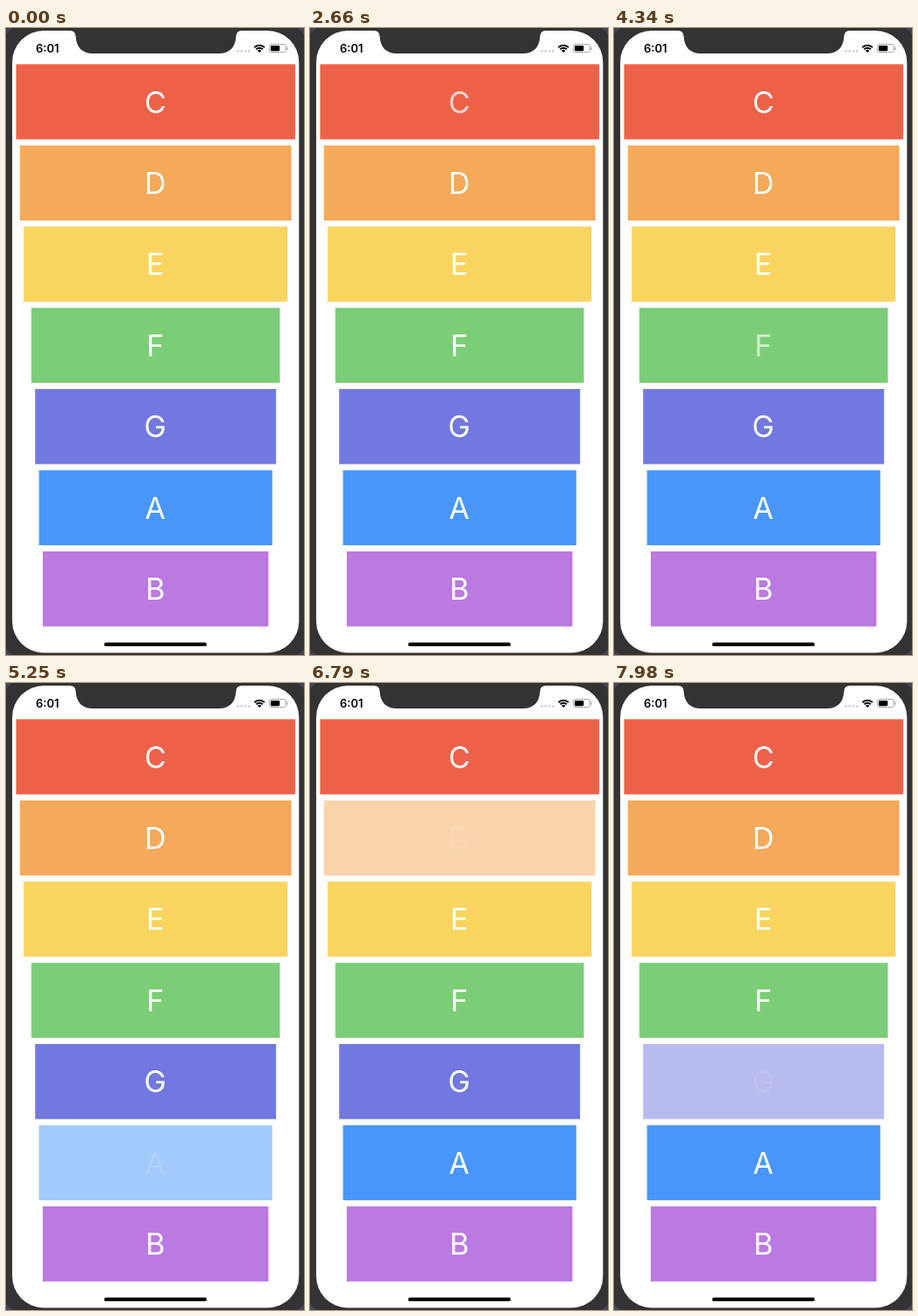
Recreate the animation shown at these times as an HTML page with a canvas. Size 340 by 714 pixels, loop 8 s.

```html
<!DOCTYPE html>
<html lang="en">
<head>
<meta charset="utf-8">
<title>Xylophone</title>
<style>
  html, body { margin: 0; width: 100%; height: 100%; overflow: hidden; background: #333335; }
  canvas { display: block; width: 340px; height: 714px; }
</style>
</head>
<body>
<canvas id="stage"></canvas>
<script>
const W = 340, H = 714, LOOP = 8000, STEP = 70;
const PT = 0.872; // pixels per point on the phone screen
const SCREEN = { x: 7.1, y: 3, w: 327.2, h: 708.5 };
const BEZEL = '#333335';

const keys = [
  { note: 'C', color: '#ed6149', inset: 5, taps: [2370] },
  { note: 'D', color: '#f4a95b', inset: 10, taps: [2930, 6760] },
  { note: 'E', color: '#f9d560', inset: 15, taps: [3490] },
  { note: 'F', color: '#7ccd77', inset: 25, taps: [4080] },
  { note: 'G', color: '#7278dd', inset: 30, taps: [4640, 7950] },
  { note: 'A', color: '#4896f9', inset: 35, taps: [5120] },
  { note: 'B', color: '#bb79e2', inset: 40, taps: [5610] }
];

const HOLD = 80;    // finger down before release
const DIM = 200;    // key stays at half opacity
const FADE = 470;   // title returns to full opacity

const canvas = document.getElementById('stage');
const ctx = canvas.getContext('2d');
const ratio = window.devicePixelRatio || 1;
canvas.width = W * ratio;
canvas.height = H * ratio;
ctx.scale(ratio, ratio);

const ease = p => p * p * (3 - 2 * p);

function roundRect(x, y, w, h, r, color) {
  ctx.beginPath();
  ctx.roundRect(x, y, w, h, r);
  ctx.fillStyle = color;
  ctx.fill();
}

function circle(x, y, r, color) {
  ctx.beginPath();
  ctx.arc(x, y, r, 0, Math.PI * 2);
  ctx.fillStyle = color;
  ctx.fill();
}

function drawPhone() {
  ctx.fillStyle = '#44435a';
  ctx.fillRect(0, 0, W, H);
  roundRect(-9, -8, 358, 730, 41, BEZEL);
  roundRect(SCREEN.x, SCREEN.y, SCREEN.w, SCREEN.h, 36, '#fff');

  ctx.beginPath();
  ctx.moveTo(73, 2);
  ctx.lineTo(73, 3);
  ctx.quadraticCurveTo(79, 3, 79.5, 9);
  ctx.bezierCurveTo(80, 22, 87, 29, 99, 29);
  ctx.lineTo(243, 29);
  ctx.bezierCurveTo(255, 29, 262, 22, 262.5, 9);
  ctx.quadraticCurveTo(263, 3, 269, 3);
  ctx.lineTo(269, 2);
  ctx.closePath();
  ctx.fillStyle = BEZEL;
  ctx.fill();

  roundRect(112, 699.7, 117, 4.4, 2.2, '#000');
}

function drawWifi(x, y) {
  const from = -Math.PI * 0.75, to = -Math.PI * 0.25;
  ctx.strokeStyle = '#000';
  ctx.lineWidth = 1.9;
  for (const r of [8.3, 5.3]) {
    ctx.beginPath();
    ctx.arc(x, y, r, from, to);
    ctx.stroke();
  }
  ctx.beginPath();
  ctx.moveTo(x, y);
  ctx.arc(x, y, 3.1, from, to);
  ctx.closePath();
  ctx.fillStyle = '#000';
  ctx.fill();
}

function drawStatus() {
  ctx.font = '600 13px Inter, sans-serif';
  ctx.textAlign = 'left';
  ctx.fillStyle = '#000';
  ctx.fillText('6:01', 34, 27.8);

  for (let i = 0; i < 4; i++) circle(264.6 + i * 4.2, 26.4, 1.3, '#cfcfcf');
  drawWifi(289.2, 28);

  ctx.beginPath();
  ctx.roundRect(300.5, 18.5, 18.8, 9.2, 2.6);
  ctx.strokeStyle = '#a3a3a3';
  ctx.lineWidth = 1;
  ctx.stroke();
  roundRect(302, 20, 10.3, 6.2, 1.3, '#000');
  roundRect(320.2, 21.5, 1.3, 3.4, [0, 1, 1, 0], '#a3a3a3');
}

function keyState(key, t) {
  let body = 1, title = 1;
  for (const tap of key.taps) {
    const since = t - tap;
    if (since < -HOLD || since >= FADE) continue;
    title = 0.2 + 0.8 * ease(Math.max(0, since) / FADE);
    if (since >= 0 && since < DIM) body = 0.5;
  }
  return { body, title };
}

function drawKey(key, i, t) {
  const { body, title } = keyState(key, t);
  const inset = key.inset * PT;
  const y = 41.3 + i * 92.45;
  ctx.globalAlpha = body;
  ctx.fillStyle = key.color;
  ctx.fillRect(SCREEN.x + inset, y, SCREEN.w - inset * 2, 85.5);
  ctx.globalAlpha = body * title;
  ctx.fillStyle = '#fff';
  ctx.font = '400 34px Inter, sans-serif';
  ctx.textAlign = 'center';
  ctx.fillText(key.note, SCREEN.x + SCREEN.w / 2 - 0.4, y + 55.2);
  ctx.globalAlpha = 1;
}

function render(now) {
  const t = Math.floor((now % LOOP) / STEP) * STEP;
  drawPhone();
  drawStatus();
  keys.forEach((key, i) => drawKey(key, i, t));
}

let start;
function tick(now) {
  start ??= now;
  render(now - start);
  requestAnimationFrame(tick);
}
render(0);
requestAnimationFrame(tick);
</script>
</body>
</html>
```
